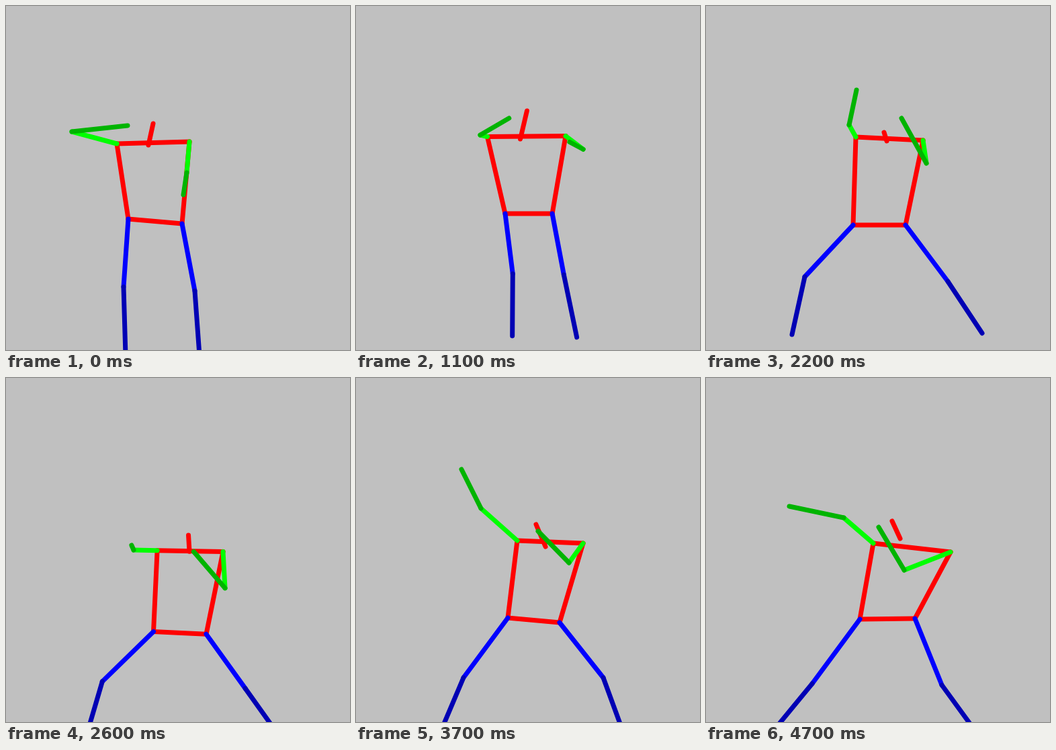
An HTML page with a canvas that plays this animation: 512 px wide and 512 px high, repeating every 4.8 s.

```html
<!DOCTYPE html>
<html lang="en">
<head>
<meta charset="utf-8">
<title>Jumping stick figure</title>
<style>
html, body { margin: 0; width: 100%; height: 100%; overflow: hidden; background: #c0c0c0; }
canvas { display: block; }
</style>
</head>
<body>
<canvas id="stage" width="512" height="512"></canvas>
<script>
const ctx = document.getElementById('stage').getContext('2d');
const LOOP = 4800, STEP = 100;
const TIMES = [0, 600, 1600, 2200, 3000, 3700, 4700];

// A joint track: x, y pairs at TIMES, plus optional [t, x, y] accents.
function track(points, ...accents) {
  const keys = TIMES.map((t, i) => [t, points[2 * i], points[2 * i + 1]]);
  return keys.concat(accents).sort((a, b) => a[0] - b[0]);
}

const head = track([219, 175, 246, 194, 260, 118, 265, 188, 276, 220, 268, 218, 277, 213], [200, 226, 166]);
const neck = track([212, 207, 241, 245, 248, 151, 269, 201, 276, 253, 282, 251, 289, 239]);

const shoulderL = track([165, 205, 194, 235, 197, 154, 223, 195, 227, 256, 240, 242, 249, 246]);
const elbowL = track([98, 187, 135, 273, 212, 111, 213, 177, 167, 265, 186, 194, 205, 208],
  [200, 86, 205], [4200, 172, 212]);
const handL = track([181, 178, 193, 294, 255, 40, 224, 125, 170, 255, 157, 136, 124, 191],
  [1800, 250, 40], [2400, 200, 196], [3500, 163, 116], [4200, 89, 192]);

const shoulderR = track([273, 202, 311, 236, 313, 151, 323, 200, 323, 254, 338, 246, 364, 259]);
const elbowR = track([269, 248, 325, 280, 333, 138, 328, 234, 324, 318, 317, 275, 295, 286], [900, 339, 248]);
const handR = track([264, 281, 306, 332, 323, 73, 291, 167, 273, 273, 271, 228, 257, 222]);

const hipL = track([182, 317, 231, 343, 213, 275, 219, 326, 220, 368, 226, 357, 229, 359]);
const kneeL = track([175, 418, 249, 430, 202, 367, 147, 403, 142, 443, 160, 446, 158, 455]);
const footL = track([178, 520, 267, 522, 177, 460, 128, 489, 112, 537, 121, 538, 88, 540]);

const hipR = track([262, 324, 291, 346, 293, 272, 297, 326, 299, 374, 303, 364, 311, 358]);
const kneeR = track([281, 424, 290, 437, 334, 363, 360, 410, 352, 453, 368, 446, 351, 457]);
const footR = track([288, 520, 298, 521, 370, 465, 411, 487, 406, 532, 402, 539, 410, 538]);

const RED = '#f00', GREEN = '#0f0', DARK_GREEN = '#00b400', BLUE = '#00f', DARK_BLUE = '#0000b4';
const BONES = [
  [RED, head, neck],
  [RED, shoulderL, shoulderR],
  [RED, shoulderL, hipL],
  [RED, shoulderR, hipR],
  [RED, hipL, hipR],
  [GREEN, shoulderL, elbowL],
  [DARK_GREEN, elbowL, handL],
  [GREEN, shoulderR, elbowR],
  [DARK_GREEN, elbowR, handR],
  [BLUE, hipL, kneeL],
  [DARK_BLUE, kneeL, footL],
  [BLUE, hipR, kneeR],
  [DARK_BLUE, kneeR, footR]
];

const slope = (a, b, axis) => (b[axis] - a[axis]) / (b[0] - a[0]);

// Tangent that never overshoots: level at turning points and ends.
function tangent(keys, i, axis) {
  if (i === 0 || i === keys.length - 1) return 0;
  const before = slope(keys[i - 1], keys[i], axis);
  const after = slope(keys[i], keys[i + 1], axis);
  return before * after > 0 ? 2 * before * after / (before + after) : 0;
}

function valueAt(keys, t, axis) {
  let i = 0;
  while (i < keys.length - 2 && t > keys[i + 1][0]) i++;
  const a = keys[i], b = keys[i + 1];
  const span = b[0] - a[0];
  const u = (t - a[0]) / span, v = 1 - u;
  return a[axis] * v * v * (1 + 2 * u) + b[axis] * u * u * (3 - 2 * u)
    + span * u * v * (v * tangent(keys, i, axis) - u * tangent(keys, i + 1, axis));
}

// The whole body sinks on landing.
const landing = t => t > 2200 && t < 3000 ? 24 * Math.sin(Math.PI * (t - 2200) / 800) : 0;

function draw(t) {
  ctx.fillStyle = '#c0c0c0';
  ctx.fillRect(0, 0, 512, 512);
  ctx.lineWidth = 7;
  ctx.lineCap = 'round';
  const dip = landing(t);
  for (const [color, from, to] of BONES) {
    ctx.strokeStyle = color;
    ctx.beginPath();
    ctx.moveTo(valueAt(from, t, 1), valueAt(from, t, 2) + dip);
    ctx.lineTo(valueAt(to, t, 1), valueAt(to, t, 2) + dip);
    ctx.stroke();
  }
}

const start = performance.now();
function tick() {
  const t = (performance.now() - start) % LOOP;
  draw(Math.floor(t / STEP) * STEP);
  requestAnimationFrame(tick);
}
tick();
</script>
</body>
</html>
```
